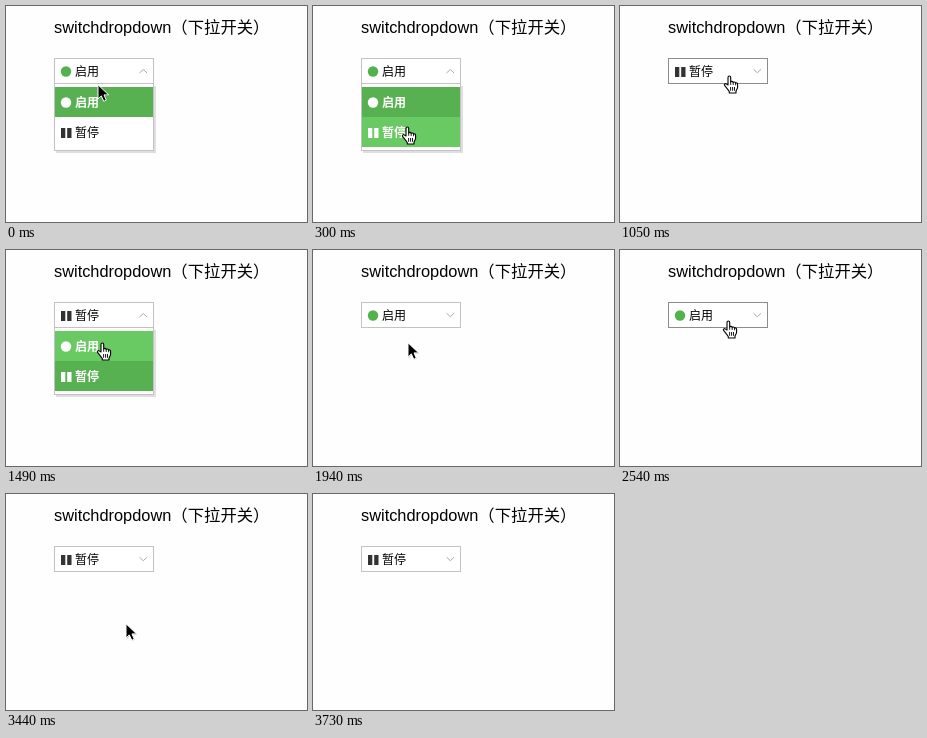
An HTML page that plays this animation: 301 by 216 pixels, repeating every 4120 ms.

```html
<!DOCTYPE html>
<html lang="zh-CN">
<head>
<meta charset="utf-8">
<title>switchdropdown</title>
<style>
  html, body { margin: 0; width: 100%; height: 100%; overflow: hidden; background: #fefefe; }
  svg { display: block; width: 301px; height: 216px; }
  text { font-family: "Liberation Sans", "Noto Sans CJK SC", "Noto Sans CJK", sans-serif; font-size: 12px; }
  .title { font-size: 16.38px; }
  .on text { font-weight: bold; }
  .on text, .on use { fill: #fff; }
  .dot { fill: #52b24c; }
  .bars { fill: #333; }
  .chevron { fill: none; stroke: #aaa; }

  .anim { animation: 4120ms step-end infinite; }
  .frame { animation-name: frame; }
  .open { animation-name: open; }
  .closed { animation-name: closed; }
  .enabled { animation-name: enabled; }
  .paused { animation-name: paused; }
  .first { animation-name: first; }
  .second { animation-name: second; }
  .pointer { animation-name: move; }
  .arrow { animation-name: arrow; }
  .hand { animation-name: hand; }

  @keyframes frame {
    0%, 32.76%, 68.93% { stroke: #c3c3c3; }
    21.84%, 61.65% { stroke: #8c8c8c; }
  }
  @keyframes open {
    0%, 32.76%, 68.93% { opacity: 1; }
    18.2%, 47.08%, 83.49%, 100% { opacity: 0; }
  }
  @keyframes closed {
    0%, 32.76%, 68.93% { opacity: 0; }
    18.2%, 47.08%, 83.49%, 100% { opacity: 1; }
  }
  @keyframes enabled {
    0%, 47.08% { opacity: 1; }
    18.2%, 83.49%, 100% { opacity: 0; }
  }
  @keyframes paused {
    0%, 47.08% { opacity: 0; }
    18.2%, 83.49%, 100% { opacity: 1; }
  }
  @keyframes first {
    0%, 7.28%, 72.57% { opacity: 1; fill: #58b151; }
    3.64%, 36.16%, 68.93% { opacity: 1; fill: #69c962; }
    32.76% { opacity: 0; fill: #58b151; }
  }
  @keyframes second {
    0%, 68.93% { opacity: 0; fill: #58b151; }
    7.28%, 72.57% { opacity: 1; fill: #69c962; }
    32.76% { opacity: 1; fill: #58b151; }
  }
  @keyframes move {
    0% { transform: translate(91px, 78px); }
    3.64% { transform: translate(88px, 104px); }
    7.28% { transform: translate(88px, 120px); }
    18.2% { transform: translate(94px, 115px); }
    21.84% { transform: translate(106px, 69px); }
    25.48% { transform: translate(103px, 69px); }
    32.76% { transform: translate(99px, 84px); }
    36.16% { transform: translate(90px, 92px); }
    47.08% { transform: translate(94px, 92px); }
    50.72% { transform: translate(100px, 98px); }
    58% { transform: translate(103px, 80px); }
    61.65% { transform: translate(102px, 70px); }
    68.93% { transform: translate(102px, 92px); }
    72.57% { transform: translate(100px, 126px); }
    83.49% { transform: translate(119px, 129px); }
    86.89%, 100% { transform: translate(249px, 153px); }
  }
  @keyframes arrow {
    0%, 18.2%, 32.76%, 47.08%, 83.49% { opacity: 1; }
    3.64%, 25.48%, 36.16%, 61.65%, 90.53%, 100% { opacity: 0; }
  }
  @keyframes hand {
    0%, 18.2%, 32.76%, 47.08%, 83.49%, 100% { opacity: 0; }
    3.64%, 25.48%, 36.16%, 61.65% { opacity: 1; }
  }
</style>
</head>
<body>
<svg viewBox="0 0 301 216">
  <defs>
    <circle id="dot" cx="60" cy="0" r="5.2"/>
    <path id="bars" d="M55-5h4.3V5H55zM61.2-5h4.3V5h-4.3z"/>
  </defs>

  <text class="title" x="48" y="27">switchdropdown（下拉开关）</text>

  <g class="anim open">
    <path d="M50 146h99V80" fill="none" stroke="#000" stroke-opacity=".12" stroke-width="2"/>
    <rect x="48.5" y="77.5" width="99" height="67" fill="#fff" stroke="#c3c3c3"/>
    <use href="#dot" class="dot" y="96.5"/>
    <text x="69" y="101">启用</text>
    <use href="#bars" class="bars" y="127"/>
    <text x="69" y="131">暂停</text>
    <g class="on anim first">
      <rect x="49" y="81" width="98" height="30"/>
      <use href="#dot" y="96.5"/>
      <text x="69" y="101">启用</text>
    </g>
    <g class="on anim second">
      <rect x="49" y="111" width="98" height="30"/>
      <use href="#bars" y="127"/>
      <text x="69" y="131">暂停</text>
    </g>
  </g>

  <rect class="anim frame" x="48.5" y="52.5" width="99" height="25" fill="#fff"/>
  <g class="anim enabled">
    <use href="#dot" class="dot" y="65.5"/>
    <text x="69" y="70">启用</text>
  </g>
  <g class="anim paused">
    <use href="#bars" class="bars" y="66"/>
    <text x="69" y="70">暂停</text>
  </g>
  <path class="chevron anim open" d="M133.5 67l3.8-3.5 3.8 3.5"/>
  <path class="chevron anim closed" d="M133.5 63.2l3.8 3.5 3.8-3.5"/>

  <g class="anim pointer">
    <g class="anim arrow" stroke-linejoin="round">
      <path d="M1.5 1.8v14.2l3.3-3.1 2.4 4.9 2.6-1.1-2.2-4.9h4.7z" fill="#000" opacity=".25"/>
      <path d="M1 .8v14.2l3.3-3.1 2.5 5.4 2.5-1.1-2.3-5.3h4.7z" fill="#000" stroke="#fff"/>
    </g>
    <g class="anim hand" stroke="#000" stroke-width="1.1" stroke-linejoin="round" stroke-linecap="round">
      <path fill="#fff" d="M5 10V2.6c0-2.2 2.7-2.2 2.7 0V7c.4-1 2.3-.8 2.5.5.5-.9 2.2-.6 2.4.7.8-.7 2-.1 2 1.2v2.8c0 1.4-1.3 2.6-1.6 4V18H6.3v-1.3C5.6 15 3.2 12.6 1.6 10.4.8 9.1 2.4 8 3.6 9.1z"/>
      <path fill="none" stroke-width=".9" d="M7.7 7v2.4M10.2 7.6v2M12.6 8.3v1.6M7.6 12.4v3M9.6 12.4v3M11.5 12.4v3"/>
    </g>
  </g>
</svg>
</body>
</html>
```
